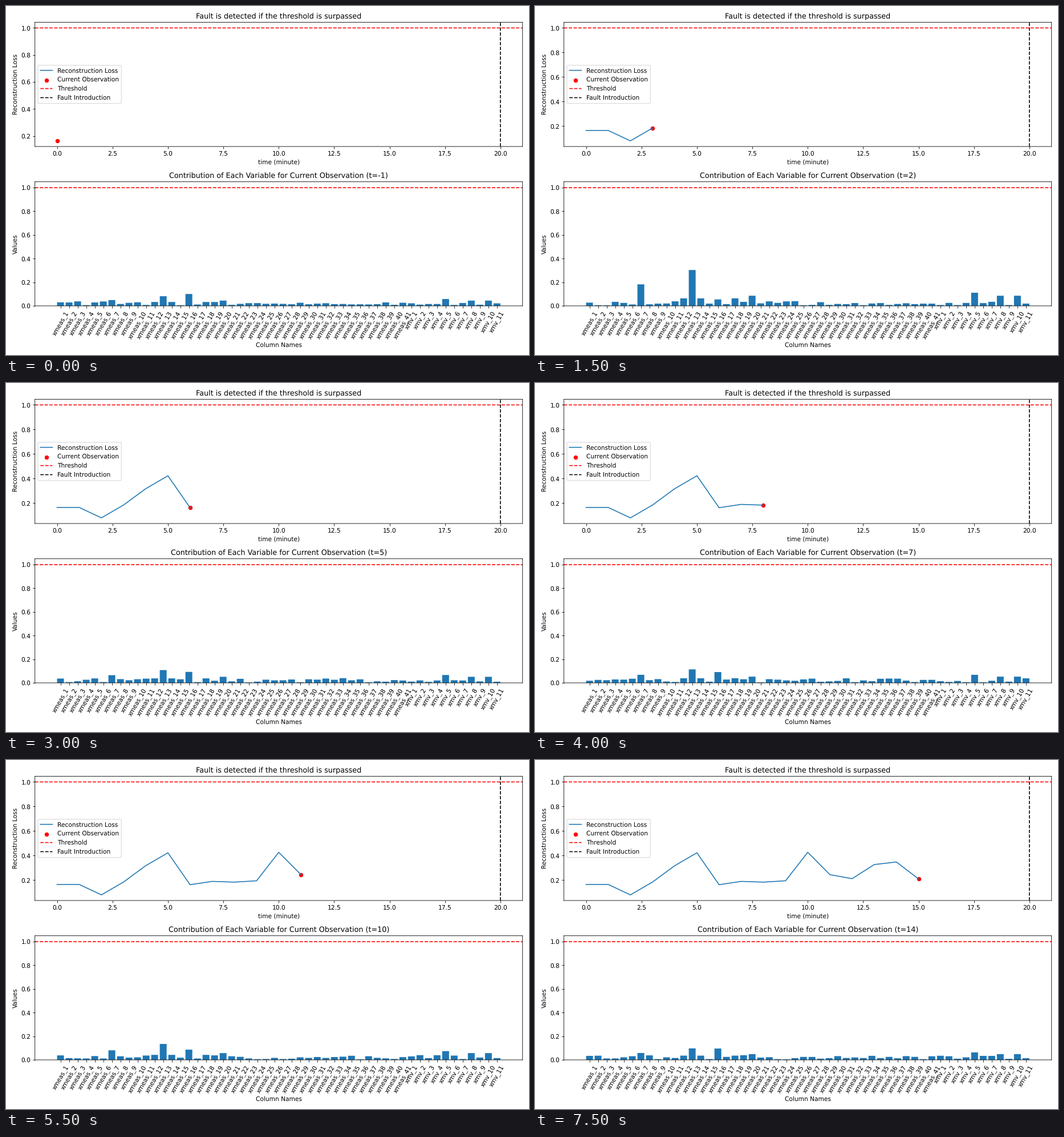
Animation of 917x611 px, one loop 8000 ms. Source, as a matplotlib script:

```python
import numpy as np
import matplotlib.pyplot as plt
from matplotlib.animation import FuncAnimation

W, H, DPI = 917, 611, 76.4
STEPS = 16

LOSS = np.array([0.165, 0.165, 0.0803, 0.185, 0.318, 0.423, 0.163, 0.19, 0.184,
                 0.195, 0.427, 0.245, 0.212, 0.327, 0.348, 0.21, 0.18])
NAMES = [f"xmeas_{i}" for i in range(1, 42)] + [f"xmv_{i}" for i in range(1, 12)]

# Soft edges and unhinted glyphs, as in a smoothly scaled chart
plt.rcParams.update({"path.snap": False, "text.hinting": "none"})


def contributions(step):
    """Low noise floor plus a few variables that follow the loss."""
    rng = np.random.default_rng(40 + step)
    values = rng.uniform(0.004, 0.04, len(NAMES))
    loss = LOSS[step + 1]

    def bump(name, height):
        values[NAMES.index(name)] = height

    bump("xmeas_13", 3 * loss ** 2)
    bump("xmeas_7", 1.8 * loss ** 2)
    bump("xmeas_16", 0.15 * (1 - 2 * loss))
    bump("xmv_5", 0.35 * loss)
    for name in ("xmeas_20", "xmv_8", "xmv_10"):
        bump(name, 0.27 * loss)
    for name in ("xmeas_12", "xmeas_14", "xmeas_18"):
        bump(name, 0.2 * loss)
    return values


def panel(top, bottom):
    left, right = 50.7, 905.7
    return fig.add_axes([left / W, 1 - bottom / H, (right - left) / W, (bottom - top) / H])


fig = plt.figure(figsize=((W + 0.01) / DPI, (H + 0.01) / DPI), dpi=DPI)

ax = panel(28.5, 246)
line, = ax.plot([], [], label="Reconstruction Loss")
dot = ax.scatter([0], [LOSS[0]], color="red", label="Current Observation")
ax.axhline(1, color="red", ls="--", label="Threshold")
ax.axvline(20, color="black", ls="--", label="Fault Introduction")
ax.set(xlim=(-1, 21), xlabel="time (minute)", ylabel="Reconstruction Loss",
       title="Fault is detected if the threshold is surpassed")
ax.legend(loc="center left")

bx = panel(307.7, 525)
bars = bx.bar(NAMES, np.zeros(len(NAMES)))
bx.axhline(1, color="red", ls="--")
bx.margins(x=0.05)
bx.set(ylim=(0, 1.05), xlabel="Column Names", ylabel="Values")
bx.tick_params(axis="x", rotation=60)
title = bx.set_title("")


def update(step):
    seen = LOSS[:step + 1]
    line.set_data(np.arange(step + 1), seen)
    dot.set_offsets([[step, seen[-1]]])
    low = seen.min()
    pad = 0.05 * (1 - low)
    ax.set_ylim(low - pad, 1 + pad)
    for bar, height in zip(bars, contributions(step)):
        bar.set_height(height)
    title.set_text(f"Contribution of Each Variable for Current Observation (t={step - 1})")
    return line, dot, title, *bars


anim = FuncAnimation(fig, update, frames=STEPS, interval=500, repeat=True, repeat_delay=0)
plt.show()
```
